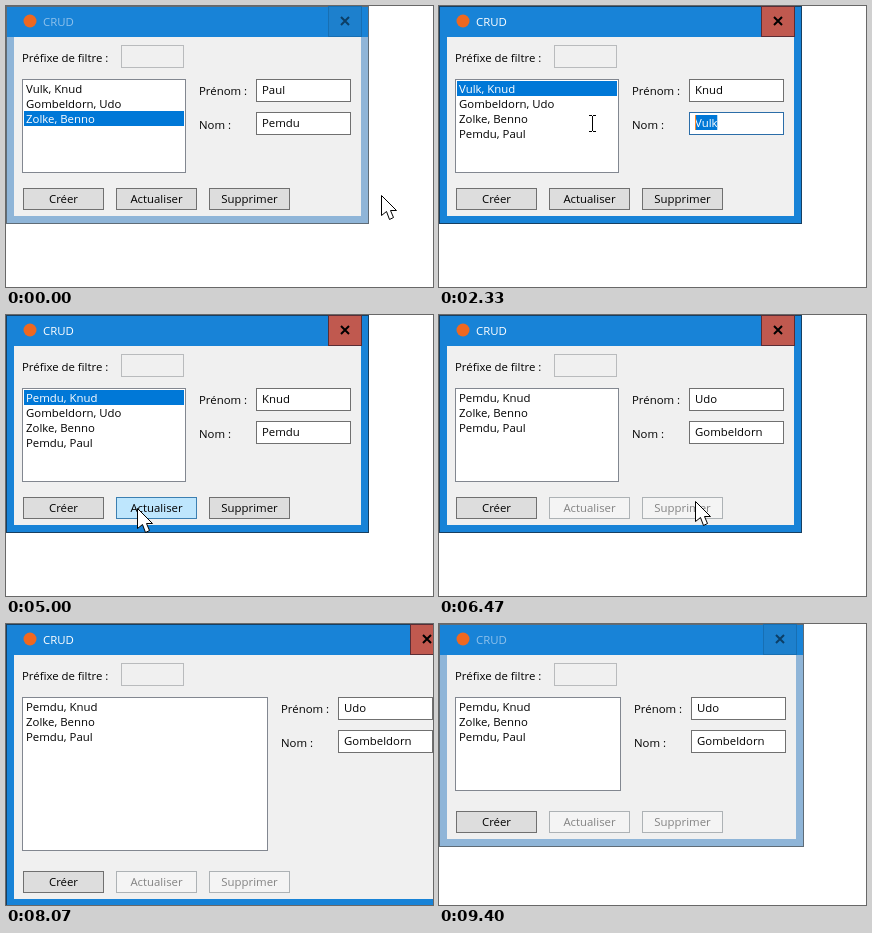
Recreate the animation shown at these times as an HTML page with a canvas. Size 427 by 281 pixels, loop 9.54 s.

```html
<!DOCTYPE html>
<html lang="fr">
<head>
<meta charset="utf-8">
<title>CRUD</title>
<style>
html, body { margin: 0; height: 100%; overflow: hidden; background: #fff; }
canvas { display: block; width: 100vw; height: 100vh; }
</style>
</head>
<body>
<canvas id="stage" width="427" height="281"></canvas>
<script>
const ctx = document.getElementById('stage').getContext('2d');
const LOOP = 9540, TICK = 200 / 3;
const BLUE = '#1883d7', SELECT = '#0078d7', FACE = '#f0f0f0';
const FONT = '11.4px "Open Sans", "Noto Sans", sans-serif';

// Moments at which the state changes
const AT = {
  activate: 670, create: 730, pickFirst: 1530, loadFirst: 1730,
  drag: 2070, dragEnd: 2600, clear: 2930, reappear: 4070,
  press: 4800, update: 4870, pickSecond: 5730, remove: 6470,
  resize: 7070, release: 8930, gone: 9200, deactivate: 9400
};
const KEYSTROKES = [3330, 3400, 3470, 3530, 3670];
const TYPED = 'Pemdu';

// time, x, y
const POINTER = [
  [0, 375, 189], [200, 315, 190], [470, 100, 192], [600, 60, 190], [870, 60, 190],
  [1000, 61, 178], [1400, 62, 82], [1670, 62, 82],
  [1870, 200, 106], [2000, 292, 114], [2130, 285, 117], [2330, 153, 117], [2530, 72, 109], [2600, 61, 106],
  [4000, 61, 106], [4200, 75, 125], [4530, 122, 184], [4700, 131, 193], [5000, 131, 193],
  [5200, 118, 160], [5470, 80, 99], [5600, 74, 94], [5800, 74, 94],
  [6000, 130, 125], [6270, 242, 179], [6400, 256, 186], [6670, 256, 186],
  [6870, 320, 208], [7070, 359, 223], [7470, 359, 223],
  [7670, 408, 254], [7930, 456, 294], [8000, 456, 294], [8400, 385, 246], [8600, 360, 223],
  [8870, 360, 223], [9200, 122, 285]
];
// time, width, height
const SIZE = [
  [7470, 363, 218], [7670, 410, 251], [7930, 456, 290],
  [8000, 456, 290], [8400, 394, 249], [8600, 365, 223]
];

function track(keys, t) {
  const next = keys.findIndex(k => k[0] > t);
  if (next === 0) return keys[0].slice(1);
  if (next < 0) return keys[keys.length - 1].slice(1);
  const [a, b] = [keys[next - 1], keys[next]];
  const p = (t - a[0]) / (b[0] - a[0]);
  return [1, 2].map(i => Math.round(a[i] + (b[i] - a[i]) * p));
}

function fill(x, y, w, h, color) {
  ctx.fillStyle = color;
  ctx.fillRect(x, y, w, h);
}

function box(x, y, w, h, color, border) {
  fill(x, y, w, h, border);
  fill(x + 1, y + 1, w - 2, h - 2, color);
}

function text(str, x, y, color = '#000', align = 'left') {
  ctx.fillStyle = color;
  ctx.textAlign = align;
  ctx.fillText(str, x, y);
}

function shape(x, y, points) {
  ctx.beginPath();
  points.forEach(([px, py]) => ctx.lineTo(x + px + .5, y + py + .5));
  ctx.closePath();
  ctx.fillStyle = '#fff';
  ctx.strokeStyle = '#000';
  ctx.lineWidth = 1;
  ctx.fill();
  ctx.stroke();
}

function drawFrame(w, h, active) {
  box(0, 0, w, h, active ? BLUE : '#8fb5d8', active ? '#173f61' : '#5f6c77');
  fill(1, 1, w - 2, 30, BLUE);
  fill(8, 31, w - 16, h - 39, FACE);
  ctx.beginPath();
  ctx.arc(24, 15, 6.5, 0, Math.PI * 2);
  ctx.fillStyle = '#ef6820';
  ctx.fill();
  text('CRUD', 37, 20, active ? '#fff' : '#8fc1eb');
  box(w - 41, 0, 34, 31, active ? '#c0594f' : '#1d80cd', active ? '#592d35' : '#176fb3');
  ctx.beginPath();
  for (const s of [-1, 1]) {
    ctx.moveTo(w - 28, 15 - 4 * s);
    ctx.lineTo(w - 20, 15 + 4 * s);
  }
  ctx.strokeStyle = active ? '#000' : '#0c3e66';
  ctx.lineWidth = 2;
  ctx.stroke();
}

function drawList(right, h, rows, selected) {
  const height = 94 + 15 * Math.floor((h - 218) / 15);
  box(16, 73, right - 16, height, '#fff', '#828790');
  rows.forEach((row, i) => {
    const y = 75 + 15 * i;
    if (i === selected) fill(18, y, right - 20, 15, SELECT);
    text(row, 20, y + 12, i === selected ? '#fff' : '#000');
  });
}

function drawButton(label, x, y, enabled, hover, pressed) {
  const [face, border] = !enabled ? ['#f4f4f4', '#adb2b5']
    : pressed ? ['#c4e5f6', '#2c628b']
    : hover ? ['#bee6fd', '#3c7fb1'] : ['#dddddd', '#707070'];
  box(x, y, 81, 22, face, border);
  text(label, x + 40.5, y + 15, enabled ? '#000' : '#838383', 'center');
}

function drawName(x, value, t) {
  const focused = t >= AT.drag && t < AT.press;
  box(x, 106, 95, 23, '#fff', focused ? '#2b6da8' : '#707070');
  const start = x + 6, end = start + ctx.measureText(value).width;
  text(value, start, 121);
  if (!focused) return;
  if (t >= AT.clear) {
    fill(Math.round(end), 109, 1, 15, '#000');
    return;
  }
  // Selection runs from the end of the word towards its start
  const pointerX = track(POINTER, t)[0];
  const left = pointerX < start ? start : pointerX > end ? end : pointerX;
  ctx.save();
  ctx.beginPath();
  ctx.rect(left, 109, end - left, 15);
  ctx.clip();
  fill(left, 109, end - left, 15, SELECT);
  text(value, start, 121, '#fff');
  ctx.restore();
  fill(Math.round(left), 109, 1, 15, '#ff8728');
}

function drawPointer(t, x, y, overField) {
  if ((t >= AT.clear && t < AT.reappear) || t >= AT.gone) return;
  if (t >= AT.resize && t < AT.release) {
    shape(x, y, [[-9, -9], [-2, -9], [-4.5, -6.5], [6.5, 4.5], [9, 2],
      [9, 9], [2, 9], [4.5, 6.5], [-6.5, -4.5], [-9, -2]]);
  } else if (overField || (t >= AT.drag && t < AT.dragEnd)) {
    fill(x, y - 7, 1, 15, '#000');
    for (const dy of [-8, 8]) {
      fill(x - 3, y + dy, 3, 1, '#000');
      fill(x + 1, y + dy, 3, 1, '#000');
    }
  } else {
    shape(x, y, [[0, 0], [0, 20], [5, 16], [8, 24], [12, 22], [9, 15], [15, 15]]);
  }
}

function content(t) {
  const rows = [t < AT.update ? 'Vulk, Knud' : 'Pemdu, Knud', 'Gombeldorn, Udo', 'Zolke, Benno'];
  if (t >= AT.create) rows.push('Pemdu, Paul');
  if (t >= AT.remove) rows.splice(1, 1);
  const selected = t < AT.pickFirst ? 2 : t < AT.pickSecond ? 0 : t < AT.remove ? 1 : -1;
  const first = t < AT.loadFirst ? 'Paul' : t < AT.pickSecond ? 'Knud' : 'Udo';
  const typed = TYPED.slice(0, KEYSTROKES.filter(k => t >= k).length);
  const last = t < AT.loadFirst ? TYPED : t < AT.clear ? 'Vulk'
    : t < AT.pickSecond ? typed : 'Gombeldorn';
  return { rows, selected, first, last };
}

function draw(t) {
  const [w, h] = track(SIZE, t), [px, py] = track(POINTER, t);
  const { rows, selected, first, last } = content(t);
  const shift = w - 363, fieldX = 250 + shift, buttonY = h - 36;
  const inside = (x, y, bw, bh) => px >= x && px < x + bw && py >= y && py < y + bh;

  fill(0, 0, 427, 281, '#fff');
  ctx.font = FONT;
  drawFrame(w, h, t >= AT.activate && t < AT.deactivate);

  text('Préfixe de filtre :', 16, 56);
  box(115, 39, 63, 23, FACE, '#b9bbbd');
  drawList(180 + shift, h, rows, selected);
  text('Prénom :', 193 + shift, 89);
  text('Nom :', 193 + shift, 123);
  box(fieldX, 73, 95, 23, '#fff', '#707070');
  text(first, fieldX + 6, 88);
  drawName(fieldX, last, t);

  ['Créer', 'Actualiser', 'Supprimer'].forEach((label, i) => {
    const x = 17 + 93 * i;
    const hover = inside(x, buttonY, 81, 22) && t < AT.resize;
    const pressed = hover && [[AT.activate, AT.create], [AT.press, AT.update], [6400, AT.remove]]
      .some(([from, to]) => t >= from && t < to);
    drawButton(label, x, buttonY, i === 0 || selected >= 0, hover, pressed);
  });

  drawPointer(t, px, py, inside(fieldX, 73, 95, 23) || inside(fieldX, 106, 95, 23));
}

function animate() {
  const time = performance.now() % LOOP;
  // The picture advances fifteen times per second
  draw(Math.round(Math.floor((time + 4) / TICK) * TICK / 10) * 10);
  requestAnimationFrame(animate);
}
animate();
</script>
</body>
</html>
```
